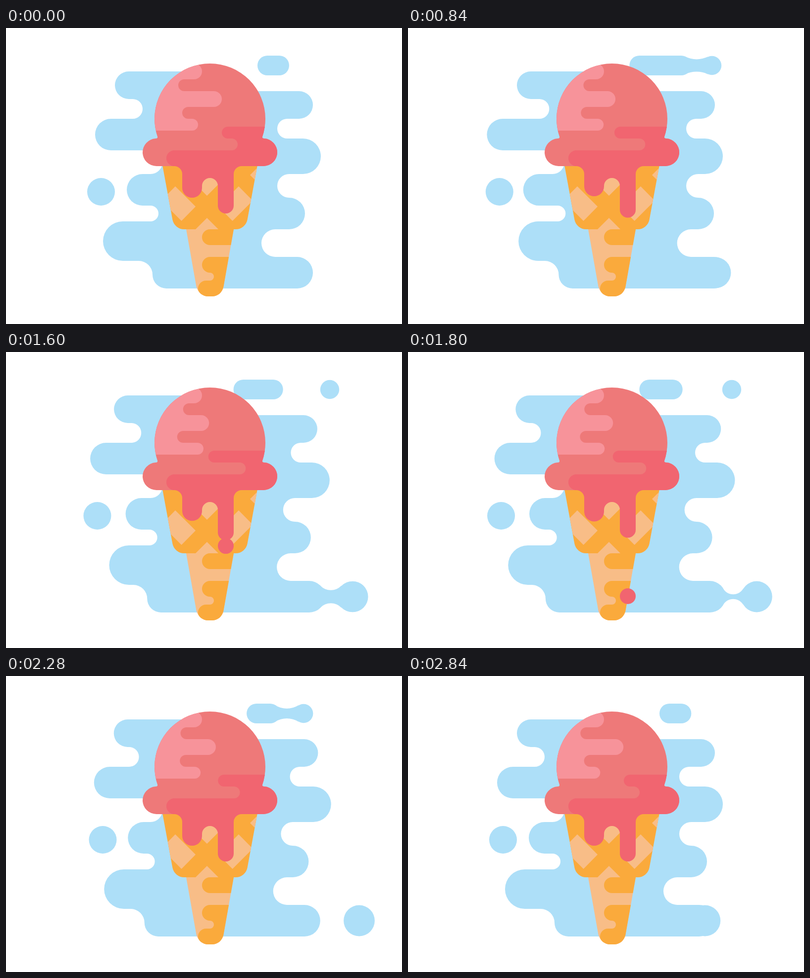
Animation, 800 px wide and 600 px high, one loop 2.88 s. Source, as an HTML page:

```html
<!DOCTYPE html>
<html lang="en">
<head>
<meta charset="utf-8">
<title>Ice cream</title>
<style>
  html, body { margin: 0; width: 100%; height: 100%; overflow: hidden; background: #fff; }
  svg { display: block; width: 100vw; height: 100vh; }
  .sky { fill: #addff8; }
  .scoop { fill: #ee7979; }
  .shine { fill: #f7939a; }
  .sauce { fill: #f16570; }
  .cone { fill: #faaa3c; }
  .wafer { fill: #f8bd87; }
</style>
</head>
<body>
<svg viewBox="0 0 800 600">
  <defs>
    <clipPath id="ball"><circle cx="412" cy="184" r="112"/></clipPath>
    <clipPath id="ice">
      <circle cx="412" cy="184" r="112"/>
      <rect x="276" y="224" width="272" height="56" rx="28"/>
      <path d="M302 225V224Q307 224 306 220L312 225ZM522 225V224Q517 224 518 220L512 225Z"/>
    </clipPath>
    <clipPath id="cup"><path d="M316.2 279L336.3 388.3A24 24 0 0 0 360 408H464A24 24 0 0 0 487.7 388.3L507.8 279Z"/></clipPath>
    <clipPath id="tip"><path d="M364 408L384.5 524C388 537 398 544 408 544H416C427 544 437 537 439.5 524L460 408Z"/></clipPath>
  </defs>

  <g class="sky">
    <path id="cloud"/>
    <path id="cloudDrop"/>
    <path id="pill"/>
    <path id="pillDrop"/>
    <circle id="dot" cy="332" r="28"/>
  </g>

  <g clip-path="url(#tip)">
    <rect class="wafer" x="350" y="400" width="120" height="150"/>
    <path class="cone" d="M470 408H412A16 16 0 0 0 412 440H470ZM470 464H412A16 16 0 0 0 412 496A8 8 0 0 1 412 512H404A16 16 0 0 0 404 544H470Z"/>
  </g>
  <g clip-path="url(#cup)">
    <rect class="cone" x="300" y="270" width="220" height="140"/>
    <path class="wafer" d="M342 321L383 362 354.5 391 313.5 350ZM470 321L429 362 457.5 391 498.5 350ZM406 385L380 411H432ZM406 340L376 310 406 280 436 310ZM493 298L512 279V317Z"/>
  </g>

  <circle class="sauce" id="drop" cx="444"/>
  <g clip-path="url(#ice)">
    <rect class="scoop" x="270" y="70" width="290" height="212"/>
    <path class="shine" id="shine" clip-path="url(#ball)"/>
    <path class="sauce" id="sauce"/>
  </g>
  <path class="sauce" id="drip"/>
</svg>
<script>
const LOOP = 2880, FRAME = 40;
const $ = id => document.getElementById(id);
const draw = (id, d) => $(id).setAttribute('d', d);

const ramp = (t, from, to) => Math.min(1, Math.max(0, (t - from) / (to - from)));
function ease(t, from, to) {
  const u = ramp(t, from, to);
  return u * u * (3 - 2 * u);
}

// Half-round end at x, leading to height y; turn 1 is clockwise
const round = (x, r, y, turn) => `A${r} ${r} 0 0 ${turn} ${x} ${y}`;
const left = (x, r, y) => `H${x + r}` + round(x + r, r, y, 0);
const right = (x, r, y) => `H${x - r}` + round(x - r, r, y, 0);
const bayRight = (x, r, y) => `H${x - r}` + round(x - r, r, y, 1);
const bayLeft = (x, r, y) => `H${x + r}` + round(x + r, r, y, 1);

// A ball and the liquid neck that ties it to a round end at x1
function liquid(x1, r1, x2, r2, y, reach) {
  const ball = `M${x2 - r2} ${y}` + round(x2 + r2, r2, y, 1) + round(x2 - r2, r2, y, 1) + 'Z';
  const dist = x2 - x1, r = (r1 + r2) / 2;
  const pull = Math.max(0, dist - r1 - r2 + 10) / reach;
  const waist = r * Math.min(0.98, 1 - pull * pull);
  if (waist <= 0 || dist <= 0) return ball;
  const bend = (dist * dist / 4 + waist * waist - r * r) / (2 * (r - waist));
  if (bend <= 0) return ball;
  const k = r / (r + bend), dx = k * dist / 2, dy = k * (bend + waist);
  return ball + `M${x1 + dx} ${y - dy}` + round(x2 - dx, bend, y - dy, 0)
    + `L${x2 - dx} ${y + dy}` + round(x1 + dx, bend, y + dy, 0) + 'Z';
}

function drawCloud(t) {
  // The outline swings through two poses and back to rest
  const out = ease(t, 175, 960), over = ease(t, 960, 2040), back = ease(t, 2040, 2760);
  const pose = (rest, a, b) => rest + (a - rest) * (out - over) + (b - rest) * (over - back);
  const lobe = pose(588, 620, 608), edge = pose(296, 305, 274);
  draw('cloud', 'M400 88'
    + left(pose(220, 220, 217), 28, 144)
    + bayRight(pose(276, 286, 266), 20, 184)
    + left(pose(180, 158, 177), 32, 248)
    + bayRight(316, 24, 296)
    + left(pose(244, 232, 247), 32, 360)
    + bayRight(pose(308, 319, 298), 16, 392)
    + left(pose(196, 225, 199), 40, 472)
    + `H${edge - 28}` + round(edge, 28, 500, 1) + round(edge + 28, 28, 528, 0)
    + right(lobe + 32, 32, 464)
    + bayLeft(pose(516, 545.5, 548), 28, 408)
    + right(pose(604, 619, 614), 32, 344)
    + bayLeft(pose(548, 563, 558), 24, 296)
    + right(pose(636, 636, 664), 36, 224)
    + bayLeft(pose(548, 563, 582.5), 20, 184)
    + right(pose(620, 620, 634), 28, 128)
    + 'H400Z');

  const ball = 588 + 34 * ease(t, 0, 960) + 80 * ease(t, 800, 1680)
    + 11.5 * ease(t, 1600, 2280) - 125 * ease(t, 2490, 2920);
  draw('cloudDrop', liquid(lobe, 32, ball, 31.4, 496, 45));
}

function drawPill(t) {
  const start = 508 - 68 * (ease(t, 60, 1040) - ramp(t, 1100, 2840));
  const end = 552 - 20 * (ease(t, 1000, 2040) - ease(t, 2160, 2880));
  const ball = 551 + 62 * ease(t, 0, 720) + 41 * ease(t, 760, 1600) - 101 * ease(t, 1940, 2600);
  const swell = 2.2 * Math.exp(-(((ball - end - 18) / 10) ** 2));
  draw('pill', `M${end} 56` + left(start, 20, 96) + right(end + 20, 20, 56) + 'Z');
  draw('pillDrop', liquid(end, 20, ball, 19.2 + swell, 76, 55));
}

function drawDot(t) {
  const x = 192 - 7.8 * ease(t, 60, 1000) + 11.3 * ease(t, 1540, 2200) - 3.5 * ease(t, 2400, 2770);
  $('dot').setAttribute('cx', x);
}

function drawIce(t) {
  const sway = 1 - Math.abs(t / 1440 - 1);
  draw('shine', 'M290 72H380' + round(380, 16, 104, 1)
    + left(348 + 11 * sway, 12, 128)
    + bayRight(436 - 29 * sway, 16, 160)
    + left(356 - 11.5 * sway, 12, 184)
    + bayRight(388 + 12.3 * sway, 12, 208)
    + 'H290Z');

  const flow = ease(t, 240, 1280) - ease(t, 1280, 2760);
  draw('sauce', 'M600 200' + left(436 - 31 * flow, 12, 224)
    + bayRight(468 + 18.5 * flow, 12, 248)
    + left(324, 16, 280) + 'H600Z');
}

function drawDrip(t) {
  const short = 324 - 3.5 * (ease(t, 100, 1100) - ease(t, 1240, 1960));
  const long = 360 + 8.5 * (ease(t, 0, 880) - ease(t, 1440, 1860));
  draw('drip', 'M340 279V280' + round(356, 16, 296, 1)
    + `V${short}` + round(396, 20, short, 0)
    + 'V320' + round(428, 16, 320, 1)
    + `V${long}` + round(460, 16, long, 0)
    + 'V296' + round(476, 16, 280, 1) + 'V279Z');

  const fall = Math.max(0, t - 1440);
  $('drop').setAttribute('cy', 368 + 0.00098 * fall * fall);
  $('drop').setAttribute('r', t < 1440 ? 0 : 16 * (1 - ramp(t, 1840, 1920)));
}

const start = performance.now();
function tick() {
  const t = Math.floor(Math.max(0, performance.now() - start) % LOOP / FRAME) * FRAME;
  for (const part of [drawCloud, drawPill, drawDot, drawIce, drawDrip]) part(t);
  requestAnimationFrame(tick);
}
tick();
</script>
</body>
</html>
```
